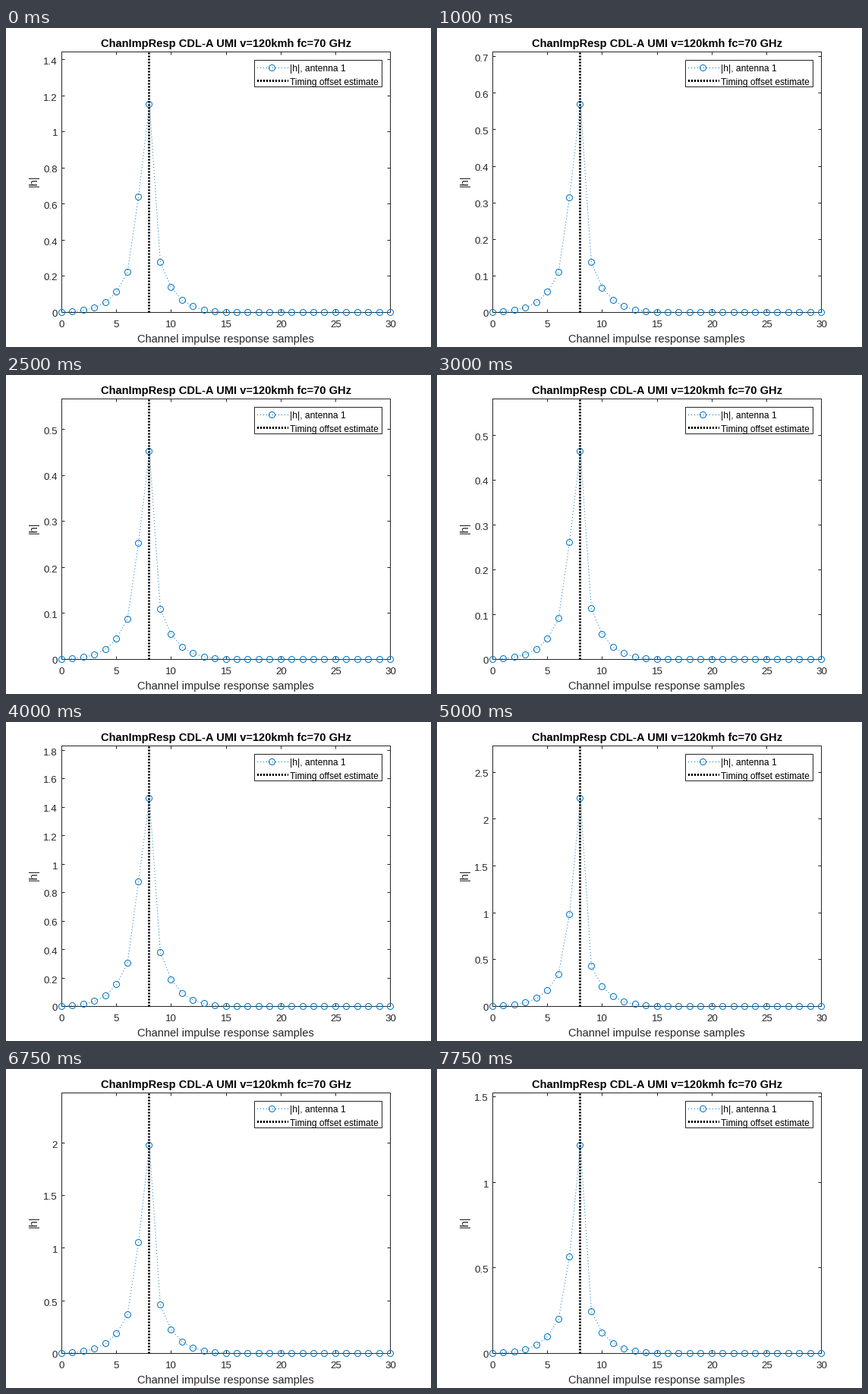
A matplotlib script for the animation above (8000 ms loop, 560 by 420 pixels).

```python
import numpy as np
import matplotlib.pyplot as plt
from matplotlib.animation import FuncAnimation
from matplotlib.patches import Circle, Rectangle

W, H, DPI = 560, 420, 80
FRAMES, STEP_MS = 32, 250
LEFT, RIGHT, TOP, BOTTOM = 73.5, 506.5, 31.5, 374.5
BLUE, GREY = "#0072BD", "#262626"
TICK_LEN = 4
SAMPLES = np.arange(31)
PEAK = 8

# Fading: frame, height of the peak, share of it in the sample before.
FADING = [(0, 1.155, 0.554), (5, 0.424, 0.55), (7, 0.436, 0.551),
          (12, 0.465, 0.561), (16, 1.465, 0.598), (20, 2.225, 0.442),
          (27, 1.978, 0.532), (30, 1.219, 0.47), (31, 1.217, 0.464)]

plt.rcParams["font.family"] = "Liberation Sans"
plt.rcParams["lines.scale_dashes"] = False
plt.rcParams["path.snap"] = False

fig = plt.figure(figsize=(W / DPI, H / DPI), dpi=DPI, facecolor="white")
ax = fig.add_axes([0, 0, 1, 1])


def pt(px):
    return px * 72 / DPI


def crisp(v):
    """Centre of the pixel that holds v."""
    return np.floor(v) + 0.5


def x_pos(sample):
    return LEFT + (RIGHT - LEFT) * sample / SAMPLES[-1]


def y_pos(share):
    return BOTTOM - (BOTTOM - TOP) * share


def line(xs, ys, color=GREY, width=1, **kw):
    ax.plot(xs, ys, color=color, lw=pt(width), dash_capstyle="butt",
            solid_capstyle="butt", **kw)


def box(x, y, w, h, fill="none"):
    ax.add_patch(Rectangle((x, y), w, h, fc=fill, ec=GREY, lw=pt(1),
                           zorder=2))


def label(x, y, text, px, color=GREY, ha="center", va="baseline", **kw):
    ax.text(x, y, text, fontsize=pt(px), color=color, ha=ha, va=va, **kw)


def thin_dots(xs, ys):
    line(xs, ys, BLUE, 1, dashes=(pt(1), pt(3)))


def thick_dots(xs, ys):
    line(xs, ys, "black", 3, dashes=(pt(2), pt(2)))


def ring(x, y):
    ax.add_patch(Circle((crisp(x), crisp(y)), 4, fc="none", ec=BLUE,
                        lw=pt(1), zorder=2))


def tick_step(limit):
    """Step with 3 to 10 ticks whose last tick comes closest to the limit."""
    steps = [m * 10.0 ** e for e in (-2, -1, 0) for m in (1, 2, 5)]
    fitting = [s for s in steps if 3 <= limit // s <= 10]
    return max(fitting, key=lambda s: round(limit // s * s, 6))


def response(lead):
    """Pulse that halves from sample to sample, relative to its peak."""
    before = lead * (0.355 * 0.51 ** (PEAK - 2.0 - SAMPLES) - 0.005)
    after = lead * (0.44 * 0.5 ** (SAMPLES - PEAK - 1.0) - 0.005)
    h = np.where(SAMPLES < PEAK, before, after).clip(0)
    h[PEAK - 1:PEAK + 1] = lead, 1
    return h


def draw_axes(limit):
    box(LEFT, TOP, RIGHT - LEFT, BOTTOM - TOP)
    for sample in range(0, 31, 5):
        x = crisp(x_pos(sample))
        line([x, x], [BOTTOM, BOTTOM - TICK_LEN])
        line([x, x], [TOP, TOP + TICK_LEN])
        label(x, 394, str(sample), 13.33)

    step = tick_step(limit)
    for k in range(int(limit / step) + 1):
        y = crisp(y_pos(k * step / limit))
        line([LEFT, LEFT + TICK_LEN], [y, y])
        line([RIGHT, RIGHT - TICK_LEN], [y, y])
        label(68, y + 6, f"{k * step:g}", 13.33, ha="right")

    label(290, 24.5, "ChanImpResp CDL-A UMI v=120kmh fc=70 GHz", 14.67,
          "black", weight="bold")
    label(289.5, 414, "Channel impulse response samples", 14.67)
    label(30 if step < 0.1 else 37, 201, "|h|", 14.67, rotation=90,
          va="center")


def draw_legend():
    box(327.5, 42.5, 168, 35, "white")
    thin_dots([331, 372], [52.5, 52.5])
    ring(350.5, 52.5)
    thick_dots([331, 372], [69.5, 69.5])
    label(374, 57.5, "|h|, antenna 1", 12, "black", "left")
    label(374, 74.5, "Timing offset estimate", 12, "black", "left")


def draw(frame):
    ax.clear()
    ax.set_xlim(0, W)
    ax.set_ylim(H, 0)
    ax.axis("off")

    at, peaks, leads = zip(*FADING)
    draw_axes(1.25 * np.interp(frame, at, peaks))
    xs = x_pos(SAMPLES)
    ys = y_pos(0.8 * response(np.interp(frame, at, leads)))
    thin_dots(xs, ys)
    for x, y in zip(xs, ys):
        ring(x, y)
    thick_dots([crisp(x_pos(PEAK))] * 2, [BOTTOM, TOP])
    draw_legend()
    return []


anim = FuncAnimation(fig, draw, frames=FRAMES, interval=STEP_MS,
                     repeat=True, repeat_delay=0)
plt.show()
```
